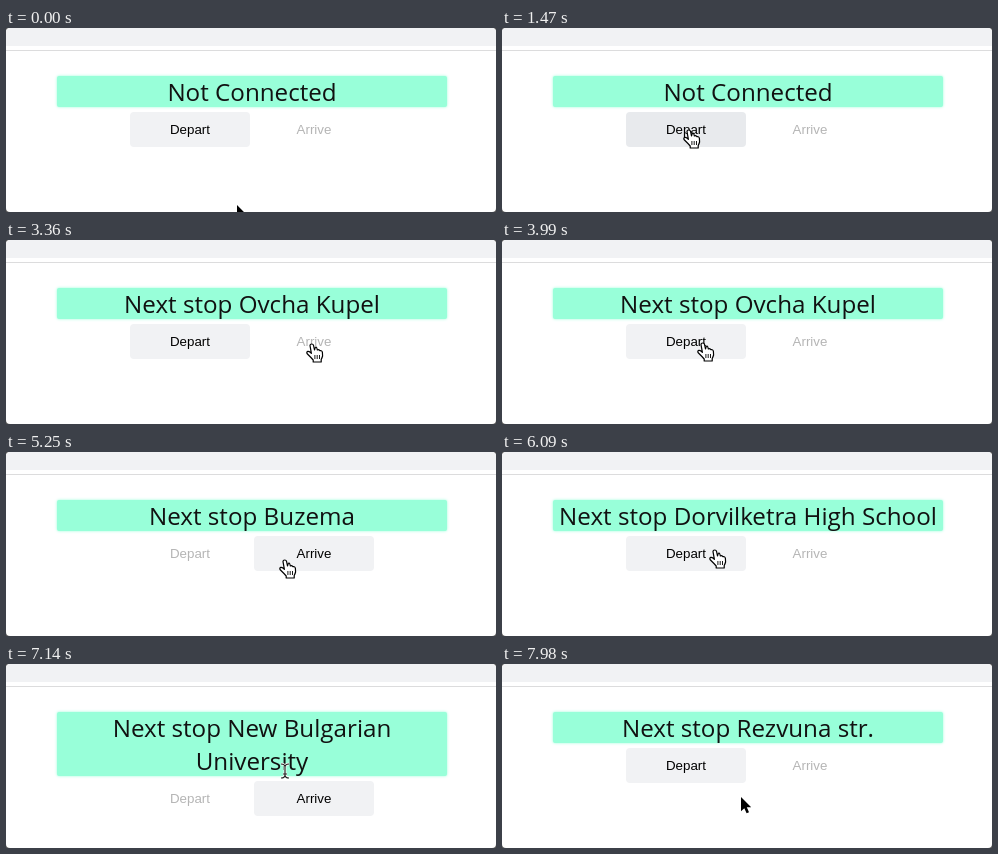
These frames come from a looping animation (490x184 px, 8000 ms). An HTML page:

```html
<!DOCTYPE html>
<html lang="en">
<head>
<meta charset="utf-8">
<title>Next stop</title>
<style>
  html, body { margin: 0; width: 100%; height: 100%; overflow: hidden; background: #555; }
  #stage {
    position: relative; width: 490px; height: 184px; overflow: hidden;
    background: #fff; border-radius: 4px;
  }
  #bar { position: absolute; left: 0; top: 0; width: 100%; height: 18px; background: #f1f2f4; }
  #rule { position: absolute; left: 0; top: 22px; width: 100%; height: 1px; background: #dcdcdd; }
  #sign {
    position: absolute; left: 51px; top: 48px; width: 390px;
    margin: -1px 0 0; text-align: center; white-space: pre; color: #111;
    font: 24.2px/33px "Open Sans", "Noto Sans", sans-serif;
  }
  #sign::before {
    content: ""; position: absolute; inset: 1px 0; z-index: -1;
    background: #98ffd9; border-radius: 2px; box-shadow: 0 0 3px #98ffd9;
  }
  #sign { z-index: 0; }
  .button {
    position: absolute; top: 84px; width: 120px; height: 35px;
    border-radius: 4px; text-align: center; color: #b5b5b5;
    font: 13.333px/35px Arial, "Liberation Sans", sans-serif;
  }
  .button.on { background: #f1f2f4; color: #000; }
  .button.on.pressed { background: #e8eaed; }
  #depart { left: 124px; }
  #arrive { left: 248px; }
  #pointer { position: absolute; left: 0; top: 0; z-index: 2; }
</style>
</head>
<body>
<div id="stage">
  <div id="bar"></div>
  <div id="rule"></div>
  <div id="sign"></div>
  <div id="depart" class="button">Depart</div>
  <div id="arrive" class="button">Arrive</div>
  <svg id="pointer" width="490" height="184">
    <g id="arrow">
      <path d="M0 0V14.2L3.3 11.2L5.6 16.3L8 15.2L5.8 10.3H10.2Z" fill="#000" stroke="#fff" stroke-width="1.2" paint-order="stroke"/>
    </g>
    <g id="hand" stroke="#000" stroke-width="1.2" stroke-linejoin="round">
      <path fill="#fff" d="M-2 1.6Q-2 0-.3 0Q1.3 0 1.6 1.6L2.5 6Q4-.1 5.4 6Q6.6 5.2 7.9 6.7Q10 6.2 10.4 8.4L10.6 12Q10 14 9.2 15.5V18H1.2V16Q-1 13.5-4.8 9.8Q-5.8 8-4.2 7.4Q-2.6 7-.6 9.4Z"/>
      <path fill="none" stroke-width=".9" d="M2.9 11v4M5.2 11v4M7.5 11v4"/>
    </g>
    <g id="beam" fill="none">
      <path stroke="#fff" stroke-width="2.6" d="M-4-7Q0-7 0-4V4Q0 7-4 7M4-7Q0-7 0-4M0 4Q0 7 4 7M-2 3H2"/>
      <path stroke="#222" stroke-width="1.2" d="M-4-7Q0-7 0-4V4Q0 7-4 7M4-7Q0-7 0-4M0 4Q0 7 4 7M-2 3H2"/>
    </g>
  </svg>
</div>
<script>
const LOOP = 8000, STEP = 70, LINE = 33, PRESS = 210;
const $ = id => document.getElementById(id);
const [sign, depart, arrive] = ["sign", "depart", "arrive"].map($);
const cursors = ["arrow", "hand", "beam"].map($);

// start time, text
const stops = [
  [0, "Not Connected"],
  [1820, "Next stop Depot"],
  [3360, "Next stop Ovcha Kupel"],
  [4340, "Next stop Buzema"],
  [5600, "Next stop Dorvilketra High School"],
  [6440, "Next stop New Bulgarian\nUniversity"],
  [7770, "Next stop Rezvuna str."]
];
const presses = [1470, 3080, 4060, 5320, 6160, 7490];

// time, x, y of the pointer's hot spot
const path = [
  [0, 231, 177], [630, 200, 107], [700, 200, 107], [770, 185, 103],
  [1050, 185, 103], [1120, 187, 102], [2100, 187, 102], [2590, 230, 101],
  [2940, 306, 104], [3430, 306, 104], [3920, 201, 103], [4480, 201, 103],
  [5250, 279, 108], [5740, 279, 108], [6090, 213, 98], [6580, 213, 98],
  [7140, 279, 107], [7420, 262, 132], [7770, 262, 132], [7980, 239, 133]
];

function pointerAt(t) {
  const i = path.findIndex(p => p[0] > t);
  if (i < 0) return path[path.length - 1].slice(1);
  const [t0, x0, y0] = path[i - 1], [t1, x1, y1] = path[i];
  const k = (t - t0) / (t1 - t0);
  return [x0 + (x1 - x0) * k, y0 + (y1 - y0) * k];
}

function cursorFor(x, y, drop) {
  if (y >= 84 + drop && y < 119 + drop && x >= 124 && x < 368) return "hand";
  if (y >= 47 && y < 80 + drop && x >= 51 && x < 441) return "beam";
  return "arrow";
}

function draw(t) {
  const index = stops.filter(s => s[0] <= t).length - 1;
  const text = stops[index][1];
  const drop = text.includes("\n") ? LINE : 0;
  const pressed = presses.some(p => t >= p && t < p + PRESS);

  if (sign.textContent !== text) sign.textContent = text;
  [depart, arrive].forEach((button, i) => {
    button.style.top = 84 + drop + "px";
    button.classList.toggle("on", index % 2 === i);
    button.classList.toggle("pressed", pressed);
  });

  const [x, y] = pointerAt(t);
  const kind = cursorFor(x, y, drop);
  for (const c of cursors) {
    c.style.display = c.id === kind ? "" : "none";
    c.setAttribute("transform", `translate(${x} ${y})`);
  }
}

const start = performance.now();
function tick() {
  const t = (performance.now() - start) % LOOP;
  draw(Math.floor(t / STEP) * STEP);
  requestAnimationFrame(tick);
}
tick();
</script>
</body>
</html>
```
